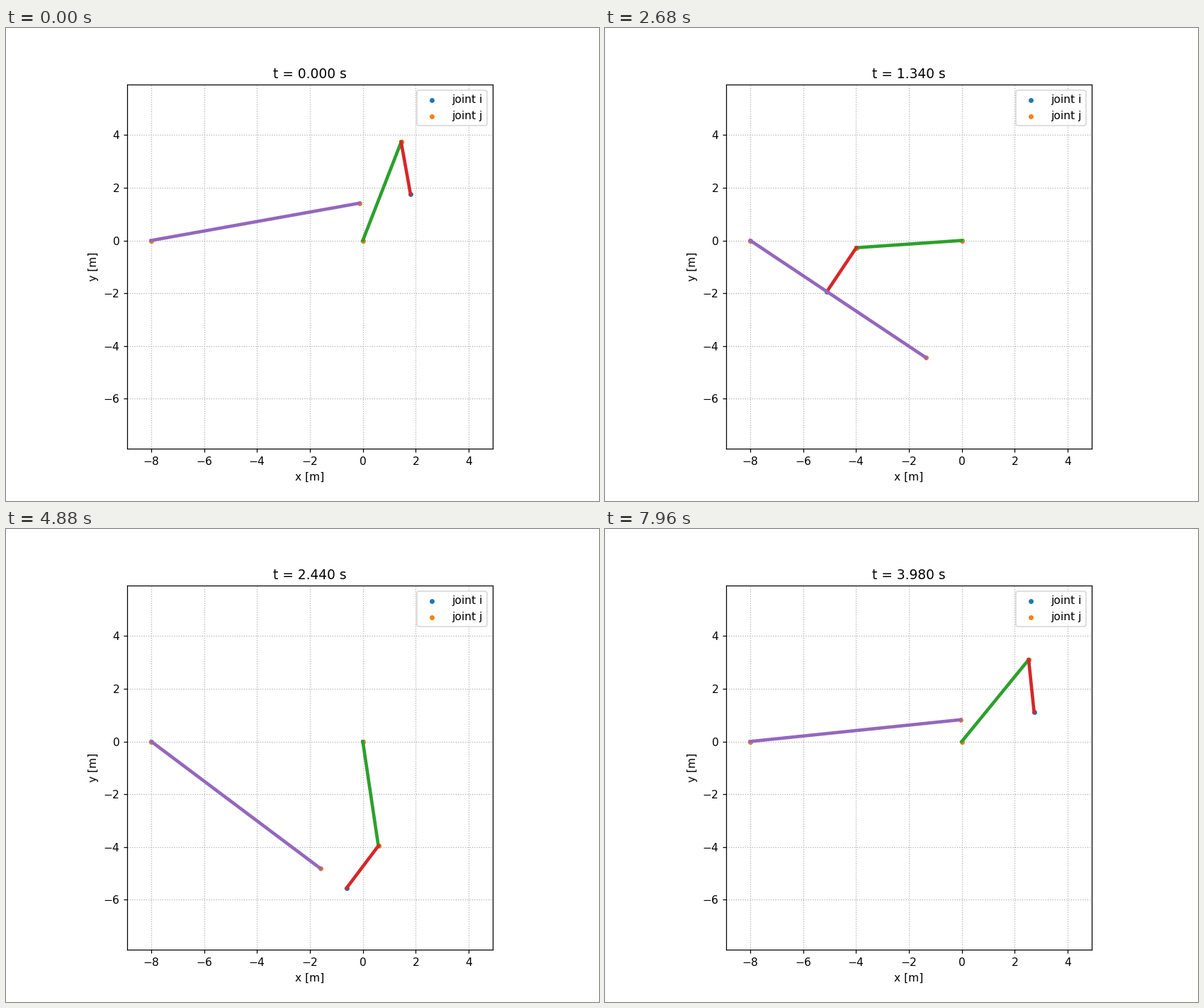
A matplotlib script that plays this animation: 837x669 px, repeating every 8 s.

```python
import numpy as np
import matplotlib.pyplot as plt
from matplotlib.animation import FuncAnimation

DPI = 111.6
FRAMES, INTERVAL = 200, 40
DT = 0.02               # simulated seconds per frame
CRANK, ARM, BAR = 4.0, 2.0, 8.0
THETA0, OMEGA = 1.2, 1.5
PIVOT = np.array([-8.0, 0.0])
ORIGIN = np.zeros(2)


def polar(length, angle):
    return length * np.array([np.cos(angle), np.sin(angle)])


def solve(t):
    """Crank pin, slider and bar tip; the arm stays perpendicular to the bar."""
    pin = polar(CRANK, THETA0 + OMEGA * t)
    dx, dy = pin - PIVOT
    phi = np.arctan2(dy, dx) - np.arcsin(ARM / np.hypot(dx, dy))
    slider = pin + polar(ARM, phi - np.pi / 2)
    tip = PIVOT + polar(BAR, phi)
    return pin, slider, tip


fig, ax = plt.subplots(figsize=(837.01 / DPI, 669.01 / DPI), dpi=DPI)
ax.set_aspect("equal")
ax.set_xlim(-8.9, 4.9)
ax.set_ylim(-7.9, 5.9)
ax.set_xlabel("x [m]")
ax.set_ylabel("y [m]")
ax.grid(linestyle=":")

joints_i = ax.scatter([], [], s=12, color="C0", label="joint i")
joints_j = ax.scatter([], [], s=12, color="C1", label="joint j")
crank, arm, bar = (ax.plot([], [], color=c, lw=3)[0] for c in ("C2", "C3", "C4"))
title = ax.set_title("")
ax.legend(loc="upper right")


def update(frame):
    t = frame * DT
    pin, slider, tip = solve(t)
    joints_i.set_offsets([ORIGIN, pin, slider, PIVOT])
    joints_j.set_offsets([ORIGIN, pin, tip, PIVOT])
    for line, ends in ((crank, (ORIGIN, pin)), (arm, (pin, slider)), (bar, (PIVOT, tip))):
        line.set_data(*np.transpose(ends))
    title.set_text(f"t = {t:.3f} s")
    return joints_i, joints_j, crank, arm, bar, title


anim = FuncAnimation(fig, update, frames=FRAMES, interval=INTERVAL,
                     init_func=lambda: update(0), repeat=True, repeat_delay=0)
plt.show()
```
